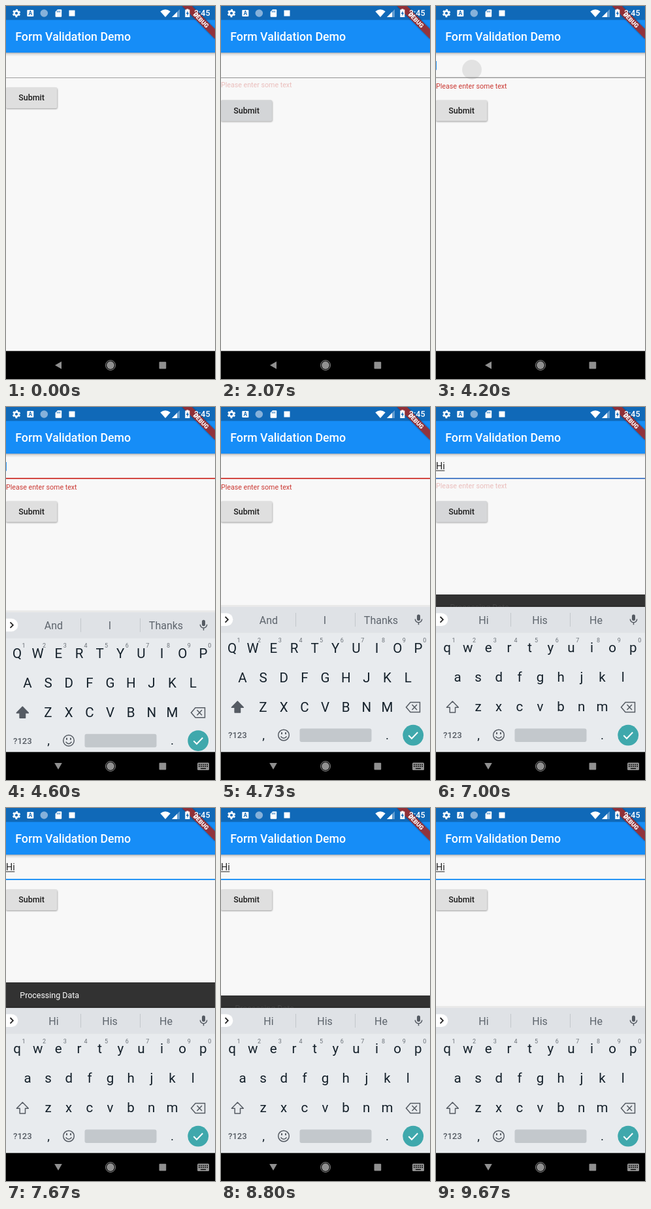
Animation, 320 px wide and 569 px high, one loop 9.74 s. Source, as an HTML page:

```html
<!DOCTYPE html>
<html lang="en">
<head>
<meta charset="utf-8">
<title>Form Validation Demo</title>
<style>
  html, body { margin: 0; width: 100%; height: 100%; overflow: hidden; background: #f8f8f8; }
  svg { display: block; width: 100%; height: 100%; font-family: Roboto, sans-serif; }
  .mid { text-anchor: middle; }
  .line { fill: none; stroke: #555b63; stroke-width: 1.5; }
</style>
</head>
<body>
<svg viewBox="0 0 320 569">
  <defs>
    <linearGradient id="shade" x2="0" y2="1">
      <stop offset="0" stop-color="#000" stop-opacity=".3"/>
      <stop offset=".4" stop-color="#000" stop-opacity=".1"/>
      <stop offset="1" stop-color="#000" stop-opacity="0"/>
    </linearGradient>
    <filter id="blur" x="-20%" y="-50%" width="140%" height="200%"><feGaussianBlur stdDeviation="1.3"/></filter>
  </defs>
  <rect width="320" height="569" fill="#f8f8f8"/>

  <!-- form -->
  <circle id="splash" cx="55" cy="97" r="15"/>
  <rect id="rule" width="320"/>
  <text id="entry" y="95" font-size="14.22" fill="#212121"></text>
  <rect id="compose" y="96.6" height="1" fill="#212121"/>
  <rect id="cursor" y="84" width="1.7" height="13.5" fill="#168df7"/>
  <text id="error" font-size="10.67" fill="#cb3a34">Please enter some text</text>
  <g id="button">
    <rect y="125.5" width="78.6" height="31.5" rx="2" opacity=".38" filter="url(#blur)"/>
    <rect y="124" width="78.2" height="32" rx="1.8" fill="#dfdfdf"/>
    <rect id="press" y="124" width="78.2" height="32" rx="1.8" fill="#d3d5d7"/>
    <text class="mid" x="39.1" y="144.4" font-size="12.44" font-weight="500" fill="#1c1c1c">Submit</text>
  </g>
  <g id="snack">
    <rect y="266" width="320" height="40" fill="#323232"/>
    <text id="snackText" x="21.3" y="290" font-size="12.44" fill="#fff">Processing Data</text>
  </g>

  <!-- app bar -->
  <rect y="71" width="320" height="6" fill="url(#shade)"/>
  <rect width="320" height="71.1" fill="#168df7"/>
  <rect width="320" height="21.3" fill="#1069b8"/>
  <text x="14.2" y="53" font-size="17.78" font-weight="500" fill="#fff">Form Validation Demo</text>
  <g transform="translate(320 0) rotate(45)">
    <rect x="-35.6" y="24.9" width="71.2" height="10.7" opacity=".45" filter="url(#blur)"/>
    <rect x="-35.6" y="24.9" width="71.2" height="10.7" fill="#a8302f" fill-opacity=".85"/>
    <text class="mid" y="33.5" font-size="9.07" font-weight="900" fill="#fff">DEBUG</text>
  </g>

  <!-- status icons -->
  <g fill="#fff">
    <circle cx="16" cy="11" r="3.4" fill="none" stroke="#fff" stroke-width="2.6"/>
    <circle cx="16" cy="11" r="5.2" fill="none" stroke="#fff" stroke-width="1.9" stroke-dasharray="2.8 2.645" transform="rotate(14 16 11)"/>
    <rect x="32.3" y="6" width="10" height="10" rx="1"/>
    <text class="mid" x="37.3" y="14" font-size="8.4" font-weight="700" fill="#1069b8">A</text>
    <circle cx="58.3" cy="11" r="5.8" fill="#86b1da"/>
    <path d="M79 5.3h5.2q1 0 1 1v9.400q0 1-1 1h-7.600q-1 0-1-1v-7z"/>
    <path d="M78.400 7.300v2.400M80.400 7.300v2.400M82.400 7.300v2.400" stroke="#1069b8"/>
    <rect x="96.500" y="6.500" width="9" height="9"/>
    <path d="M236.300 8.300Q244 2.400 251.700 8.300L244 17z"/>
    <path d="M266 5v12h-12z" opacity=".35"/>
    <path d="M262 9v8h-8z"/>
    <path d="M276.300 5.600v-1.100h3v1.100h2v11.400h-7V5.600z"/>
    <path d="M278.400 7.300l-2.700 4.600h1.800v3.300l2.600-4.700h-1.700z" fill="#1069b8"/>
    <text x="288" y="15.300" font-size="12.440" font-weight="500">3:45</text>
  </g>

  <!-- keyboard -->
  <g id="board">
    <rect y="302" width="320" height="3" opacity=".06"/>
    <rect y="305" width="320" height="222" fill="#e8ebee"/>
    <rect y="305" width="320" height="39.500" fill="#dfe2e6"/>
    <path d="M0 314.500h8.500a9.800 9.800 0 0 1 0 19.600H0z" fill="#fff"/>
    <path d="M6.500 320l4.300 4.300-4.300 4.300" class="line" style="stroke:#222;stroke-width:1.800"/>
    <path d="M114.500 314v21M205.500 314v21" stroke="#c3c7cb"/>
    <g id="hints" class="mid" font-size="16" fill="#5d646c"></g>
    <rect x="300" y="316.500" width="5" height="9.500" rx="2.500" fill="#555b63"/>
    <path class="line" d="M297.300 323.500a5.200 5.200 0 0 0 10.400 0M302.500 329v3.300"/>
    <g id="keys" class="mid" font-size="20.500" fill="#14202a"></g>
    <g id="digits" class="mid" font-size="9" fill="#6b7178"></g>
    <path id="shift" class="line" d="M25.300 449l9 9.300h-4.800v7.700h-8.400v-7.700h-4.800z" stroke-linejoin="round"/>
    <path class="line" d="M290 450.500h14.500v15H290l-6.500-7.500zM292.500 454l7.500 8M300 454l-7.500 8"/>
    <g class="mid" fill="#14202a">
      <text x="25.300" y="505.300" font-size="13" font-weight="500" fill="#555b63">?123</text>
      <text x="65" y="507" font-size="19">,</text>
      <text x="254.500" y="507" font-size="19">.</text>
    </g>
    <circle class="line" cx="96" cy="500.500" r="8.300"/>
    <path class="line" d="M91.500 502.500q4.500 5.600 9 0"/>
    <path d="M93 496.300v3M99 496.300v3" stroke="#555b63" stroke-width="2"/>
    <rect x="120.500" y="490.500" width="110" height="20.500" rx="3" fill="#c3c8cc"/>
    <circle cx="294.200" cy="500.700" r="15.900" fill="#3fa8ac"/>
    <path d="M287.300 501l4.700 4.700 9.200-9.500" fill="none" stroke="#fff" stroke-width="2"/>
  </g>

  <!-- navigation bar -->
  <rect y="526.300" width="320" height="43" fill="#000"/>
  <g fill="#909090">
    <path id="back" d="M75 548l10-5.800v11.600z"/>
    <circle cx="160" cy="548" r="5.900"/>
    <circle cx="160" cy="548" r="7.500" fill="none" stroke="#909090"/>
    <rect x="234.500" y="542.700" width="10.700" height="10.700" rx="1"/>
    <g id="picker">
      <rect x="293" y="542.500" width="18" height="11.500" rx="1.500"/>
      <path d="M295 545.500h14M295 548.300h14" stroke="#000" stroke-width="1.500" stroke-dasharray="1.700 1.375"/>
      <path d="M298 551.500h8" stroke="#000" stroke-width="1.300"/>
    </g>
  </g>
</svg>
<script>
const LOOP = 9740, FPS = 15;
const $ = id => document.getElementById(id);
const ramp = (n, a, b) => Math.min(1, Math.max(0, (n - a) / (b - a)));
const ease = p => p * p * (3 - 2 * p);
const easeOut = p => 1 - (1 - p) ** 3;
const set = (id, attrs) => { for (const k in attrs) $(id).setAttribute(k, attrs[k]); };
const write = (id, text) => { if ($(id).textContent !== text) $(id).textContent = text; };
const mix = (a, b, p) => `rgb(${a.map((v, i) => Math.round(v + (b[i] - v) * p))})`;

const GREY = [151, 151, 151], DARK = [136, 136, 136], RED = [208, 58, 52], BLUE = [22, 141, 247];
const ROWS = [['qwertyuiop', 17, 374], ['asdfghjkl', 33, 419], ['zxcvbnm', 64.5, 463.5]];
const STEP = 31.65;

function addText(parent, x, y, text) {
  const el = document.createElementNS('http://www.w3.org/2000/svg', 'text');
  el.setAttribute('x', x);
  el.setAttribute('y', y);
  el.textContent = text;
  $(parent).append(el);
  return el;
}

const keys = ROWS.flatMap(([letters, x, y]) =>
  [...letters].map((c, i) => ({ c, y, el: addText('keys', x + i * STEP, y, c) })));
[...'1234567890'].forEach((d, i) => addText('digits', 27 + i * STEP, 359, d));
const hints = [73, 159, 245].map(x => addText('hints', x, 331, ''));

let wasUpper = null;
function setCase(upper) {
  if (upper === wasUpper) return;
  wasUpper = upper;
  for (const k of keys) {
    k.el.textContent = upper ? k.c.toUpperCase() : k.c;
    k.el.setAttribute('y', k.y + (upper ? 1 : 0));
  }
  $('shift').style.fill = upper ? '#555b63' : 'none';
}

function draw(ms) {
  const n = Math.floor((ms + 5) * FPS / 1000);

  // Error message and the button it pushes down
  const shown = n < 31 ? 0
    : n < 103 ? (n < 33 ? 0.3 : 0.3 + 0.7 * ramp(n, 32, 35))
    : 1 - ramp(n, 102.7, 106);
  set('error', { opacity: shown, y: 126.2 - 3 * (1 - shown) });
  set('button', { transform: `translate(0 ${n >= 31 && n < 106 ? 19.5 : 0})` });
  const press = n < 31 ? 0 : n < 103 ? 1 - ramp(n, 32, 35) : 1 - ramp(n, 104, 108);
  set('press', { opacity: press });

  // Field underline
  const focus = ramp(n, 62, 65), height = 0.9 + 0.95 * focus;
  const color = n < 31 ? mix(GREY, GREY, 0)
    : n < 103 ? mix(DARK, RED, ramp(n, 63, 66))
    : mix(RED, BLUE, ramp(n, 102, 106));
  set('rule', { y: 109.9 - height, height, fill: color });

  // Tap splash
  set('splash', {
    r: 15 + 16 * easeOut(ramp(n, 63, 68)),
    opacity: n < 63 ? 0 : 0.085 * (1 - ramp(n, 64, 69))
  });

  // Typed text and cursor
  const typed = n < 83 ? '' : n < 85 ? 'H' : 'Hi';
  const end = [0, 10, 13.3][typed.length];
  write('entry', typed);
  set('compose', { width: end });
  const blink = n >= 63 && (n - 63) % 15 < (n < 93 ? 8 : 7);
  set('cursor', { x: end - 0.8, opacity: blink ? 1 : 0 });

  // Keyboard
  const up = easeOut(ramp(n, 65, 71));
  set('board', { transform: `translate(0 ${225 * (1 - up)})`, opacity: ramp(n, 65, 68) });
  set('back', { transform: n >= 66 ? 'rotate(-90 80 548)' : '' });
  set('picker', { opacity: n >= 66 ? 1 : 0 });
  setCase(n < 83);
  const words = [['And', 'I', 'Thanks'], ['H', 'He', 'Hey'], ['Hi', 'His', 'He']][typed.length];
  hints.forEach((el, i) => { if (el.textContent !== words[i]) el.textContent = words[i]; });

  // Snack bar
  const rise = ramp(n, 103, 107) * (1 - ramp(n, 130, 134));
  set('snack', { transform: `translate(0 ${40 * (1 - ease(rise))})`, opacity: rise ? 1 : 0 });
  set('snackText', { opacity: ramp(rise, 0.45, 1) });
}

function tick() {
  draw(performance.now() % LOOP);
  requestAnimationFrame(tick);
}
tick();
</script>
</body>
</html>
```
